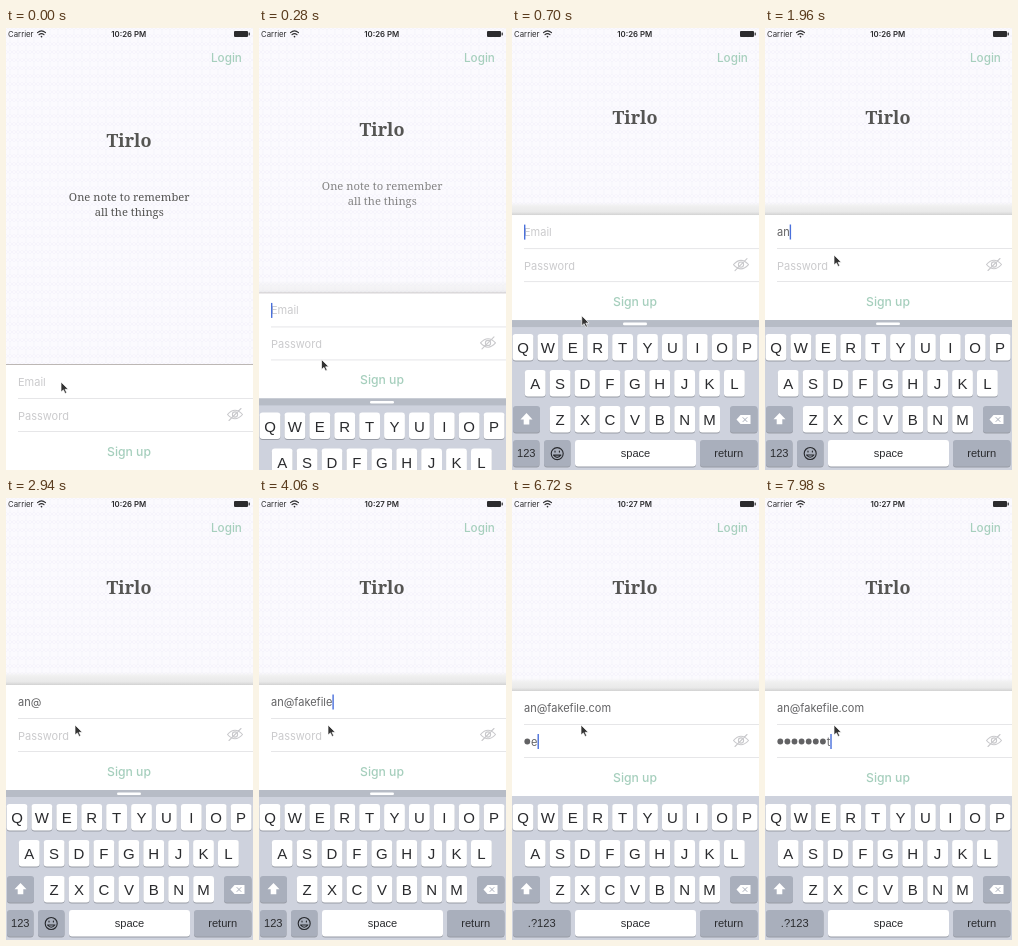
Write an HTML page that moves like this. It is 247 by 442 pixels and loops after 8000 ms.

```html
<!DOCTYPE html>
<html lang="en">
<head>
<meta charset="utf-8">
<title>Sign up form</title>
<style>
html, body { margin: 0; width: 100%; height: 100%; overflow: hidden; background: #faf9fd; }
svg { display: block; width: 247px; height: 442px; }
text { font-family: Inter, "Open Sans", sans-serif; font-size: 11px; }
.mid { text-anchor: middle; }
.serif { font-family: "Noto Serif", serif; font-size: 11.2px; text-anchor: middle; fill: #555553; }
.system { fill: #2c2c2e; }
.system text { font-size: 7.8px; }
.keys text { font-family: "Liberation Sans", Arial, sans-serif; font-size: 15px; text-anchor: middle; fill: #2a2b2e; }
.keys .small { font-size: 11.1px; }
.hint { fill: #cbcbcd; }
.typed { fill: #626264; }
.action { fill: #a6cfbd; font-weight: 500; }
.rule { stroke: #e6e6e8; }
.line { fill: none; stroke-linecap: round; stroke-linejoin: round; }
</style>
</head>
<body>
<svg viewBox="0 0 247 442">
  <defs>
    <pattern id="paper" width="8" height="8" patternUnits="userSpaceOnUse">
      <rect width="8" height="8" fill="#fbfafe"/>
      <path d="M0 2l2-2 2 2 2-2 2 2M0 6l2 2 2-2 2 2 2-2M4 2v4" class="line" stroke="#f4f2fa" stroke-width=".7"/>
    </pattern>
    <linearGradient id="shade" x2="0" y2="1">
      <stop offset="0" stop-color="#f3f3f3" stop-opacity="0"/>
      <stop offset=".3" stop-color="#f0f0f0"/>
      <stop offset=".75" stop-color="#e9e9e9"/>
      <stop offset="1" stop-color="#d2d2d2"/>
    </linearGradient>
  </defs>

  <rect width="247" height="442" fill="url(#paper)"/>
  <g class="system">
    <text x="2" y="9">Carrier</text>
    <text id="clock" class="mid" x="122.7" y="9" font-weight="600"></text>
    <g class="line" stroke="#2c2c2e" stroke-width="1.2">
      <path d="M31.5 4.6q4-3.4 8 0M33 6.6q2.5-2 5 0"/>
      <path d="M35.5 8.6v.1" stroke-width="1.6"/>
    </g>
    <rect x="228" y="3" width="14" height="6" rx="1"/>
    <rect x="242.6" y="4.6" width="1.2" height="2.8"/>
  </g>
  <text class="action" x="205" y="33.7" style="font-size:11.7px">Login</text>

  <g id="intro">
    <text class="serif" x="123" y="118.7" font-weight="bold" style="font-size:18px">Tirlo</text>
    <g id="tagline">
      <text class="serif" x="123.2" y="173">One note to remember</text>
      <text class="serif" x="123.2" y="188">all the things</text>
    </g>
  </g>

  <g id="sheet">
    <g id="form">
      <rect id="shadow" y="174" width="247" height="13" fill="url(#shade)"/>
      <rect y="187" width="247" height="112" fill="#fff"/>
      <path id="edge" d="M0 186.5h247" stroke="#bcb7b4"/>
      <path class="rule" d="M12 220.5h235M12 253.5h235"/>
      <text id="emailHint" class="hint" x="12" y="208">Email</text>
      <text id="email" class="typed" x="12" y="208"></text>
      <text id="passHint" class="hint" x="12" y="241.5">Password</text>
      <g id="dots" class="typed"></g>
      <text id="lastChar" class="typed" y="241.5"></text>
      <rect id="caret" width="1.4" height="15" fill="#4a70dc"/>
      <g class="line" stroke="#c9c9cc" stroke-width="1.1">
        <path d="M221.5 236.5q7.5-8.5 15 0q-7.5 8.5-15 0zM223 242.5l12-12"/>
        <circle cx="229" cy="236.5" r="2.6"/>
      </g>
      <text class="action mid" x="123" y="277.5" style="font-size:12.2px">Sign up</text>
    </g>
    <g class="keys">
      <rect id="board" width="247" height="160" fill="#ced2dd"/>
      <g id="strip">
        <rect y="292" width="247" height="7" fill="#b7bcc6"/>
        <rect x="111" y="294.5" width="24" height="2.6" rx="1.3" fill="#fff"/>
      </g>
      <g id="keys"></g>
      <g id="plainMode"></g>
      <g id="secureMode"></g>
      <path d="M14.5 385l6 6.3h-3.2v5h-5.6v-5h-3.2z" fill="#fff"/>
      <path d="M224.5 391.5l4-4.5h10v9h-10z" fill="#fff"/>
      <path class="line" d="M231 389.5l4 4m0-4l-4 4" stroke="#a7adb9"/>
    </g>
  </g>
  <path id="pointer" d="M0 0v10l2.4-2.1 1.7 3.6 1.6-.8-1.6-3.4h3.2z" fill="#333" stroke="#fff" stroke-width=".7"/>
</svg>
<script>
const LOOP = 8000, STEP = 140;
const EMAIL = "an@fakefile.com", PASSWORD = "testtest";
const emailTimes = [1680, 1820, 2240, ...times(3080, 8), 4130, 4250, 4360, 4470];
const passTimes = times(6580, 8);
const $ = id => document.getElementById(id);

function times(start, count) {
  return Array.from({ length: count }, (_, i) => start + i * STEP);
}

function addKey(group, label, x, y, w, dark) {
  const size = label.length > 1 ? "small" : "";
  const drop = size ? 17.3 : 19.2;
  $(group).innerHTML +=
    `<rect x="${x}" y="${y + 1}" width="${w}" height="26.5" rx="3" fill="#989ca5"/>` +
    `<rect x="${x}" y="${y}" width="${w}" height="26.5" rx="3" fill="${dark ? "#a9afbc" : "#fff"}"/>` +
    `<text class="${size}" x="${x + w / 2}" y="${y + drop}">${label}</text>`;
}

["QWERTYUIOP", "ASDFGHJKL", "ZXCVBNM"].forEach((row, r) => {
  const left = [0.6, 12.8, 37.8][r];
  [...row].forEach((c, i) => addKey("keys", c, left + i * 24.9, 306 + r * 36, 20.8));
});
addKey("keys", "", 1, 378, 27, true);
addKey("keys", "", 218, 378, 27.5, true);
addKey("keys", "space", 63, 412, 121);
addKey("keys", "return", 188, 412, 57.5, true);
addKey("plainMode", "123", 1, 412, 26.5, true);
addKey("plainMode", "", 32, 412, 26.5, true);
$("plainMode").innerHTML +=
  `<g class="line" stroke="#25272b" stroke-width="1.1"><circle cx="45.2" cy="425.5" r="6"/>
  <path d="M41.5 427q3.7 4.5 7.4 0zM43 423v1M47.4 423v1"/></g>`;
addKey("secureMode", ".?123", 1, 412, 57.5, true);
$("dots").innerHTML = [...PASSWORD].map((_, i) =>
  `<circle cx="${15.3 + i * 7.1}" cy="237.5" r="2.9"/>`).join("");

// Critically damped settling from 0 to 1
function spring(ms) {
  const x = Math.max(0, ms) * 0.0189;
  return 1 - (1 + x) * Math.exp(-x);
}
const clamp = v => Math.min(1, Math.max(0, v));
const smooth = v => v * v * (3 - 2 * v);
const mix = (a, b, k) => a + (b - a) * k;
const shift = (id, x, y) => $(id).setAttribute("transform", `translate(${x} ${y})`);
const show = (id, on) => $(id).setAttribute("opacity", Number(on));

function movePointer(t) {
  const a = smooth(clamp((t - 140) / 280));
  const b = smooth(clamp((t - 420) / 840));
  shift("pointer", mix(mix(55, 70, a), 69, b), mix(mix(354, 309, a), 227, b));
}

function drawFields(t) {
  const typed = emailTimes.filter(k => k <= t).length;
  const hidden = passTimes.filter(k => k <= t).length;
  const onPass = t >= 4690;
  $("email").textContent = EMAIL.slice(0, typed);
  show("emailHint", !typed);
  show("passHint", !hidden);
  [...$("dots").children].forEach((dot, i) => dot.setAttribute("opacity", Number(i < hidden - 1)));
  const last = $("lastChar");
  last.textContent = hidden ? PASSWORD[hidden - 1] : "";
  last.setAttribute("x", 12 + 7.1 * Math.max(0, hidden - 1));

  const since = t - Math.max(...(onPass ? [4970, ...passTimes] : [200, ...emailTimes]).filter(k => k <= t));
  const end = onPass
    ? (hidden ? 12 + 7.1 * (hidden - 1) + last.getComputedTextLength() : 12)
    : 12 + (typed ? $("email").getComputedTextLength() : 0);
  $("caret").setAttribute("x", end);
  $("caret").setAttribute("y", onPass ? 230 : 196.5);
  show("caret", since >= 0 && isFinite(since) && since % 1000 < 520);
}

function draw(now) {
  const t = Math.floor(now % LOOP / STEP) * STEP;
  const rise = spring(t - 195);
  const drop = spring(t - 4660), close = spring(t - 4850);
  $("clock").textContent = t < 3780 ? "10:26 PM" : "10:27 PM";
  shift("intro", 0, -23 * rise);
  show("tagline", clamp(1 - (t - 195) / 290));
  shift("sheet", 0, 150 * (1 - rise));
  shift("form", 0, 6 * drop);
  show("shadow", rise);
  show("edge", 1 - rise);
  $("board").setAttribute("y", 292 + 6 * close);
  shift("strip", 0, 6 * close);
  show("strip", 1 - close);
  show("plainMode", t < 4760);
  show("secureMode", t >= 4760);
  drawFields(t);
  movePointer(t);
}

const start = performance.now();
function tick() {
  draw(performance.now() - start);
  requestAnimationFrame(tick);
}
tick();
</script>
</body>
</html>
```
